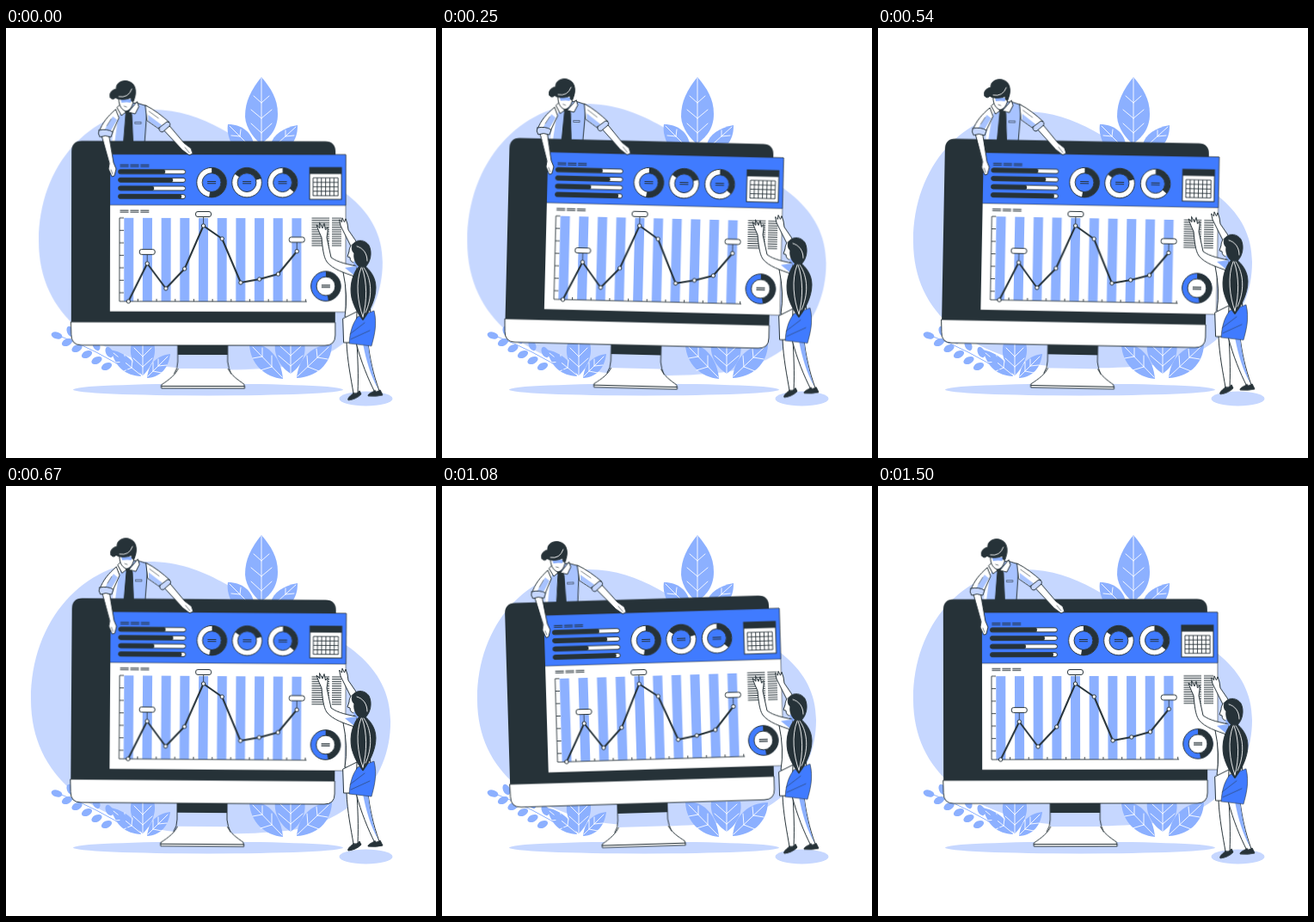
Animation, 500 px wide and 500 px high, one loop 1540 ms. Source, as an HTML page:

```html
<!DOCTYPE html>
<html lang="en">
<head>
<meta charset="utf-8">
<title>Dashboard teamwork</title>
<style>
  :root { --blue: #407bff; --mid: #8cb0ff; --light: #c6d7ff; --shirt: #a8c3ff; --ink: #263238; }
  html, body { margin: 0; width: 100%; height: 100%; overflow: hidden; background: #fff; }
  svg { display: block; width: 100vw; height: 100vh; }
  .blue { fill: var(--blue); }
  .mid { fill: var(--mid); }
  .light { fill: var(--light); }
  .shirt { fill: var(--shirt); }
  .ink { fill: var(--ink); }
  .white { fill: #fff; }
  .none { fill: none; }
  .line { stroke: var(--ink); stroke-width: 1; stroke-linejoin: round; stroke-linecap: round; }
  .vein { fill: none; stroke: #fff; stroke-width: .9; stroke-linecap: round; }
  .thin { stroke-width: .6; }

  #blob, #desk, #woman { animation: 1540ms linear -21ms infinite; }
  #blob { animation-name: beat; transform-origin: 238px 246px; }
  #desk { animation-name: sway; transform-origin: 235px 240px; }
  #woman { animation-name: rise; }
  @keyframes beat {
    0%, 29.2%, 39%, 58.4%, 100% { transform: scale(1); }
    9.7%, 48.7% { transform: scale(1.1); }
  }
  @keyframes sway {
    0%, 100% { transform: rotate(0deg); }
    25% { transform: rotate(2deg); }
    75% { transform: rotate(-2deg); }
  }
  @keyframes rise {
    0%, 100% { transform: translateY(0); }
    50% { transform: translateY(-10px); }
  }
</style>
</head>
<body>
<svg viewBox="0 0 500 500">
  <path id="blob" class="light" d="M41 248C41 160 100 98 170 97C235 97 268 136 320 156C380 178 435 210 435 272C435 340 385 385 320 392C280 396 230 397 190 392C110 378 41 335 41 248Z"/>

  <g id="plants">
    <path class="mid" d="M297 57C285 72 278 85 278 103C279 118 289 128 296 135C306 128 316 118 316 100C316 82 308 70 297 57Z"/>
    <path class="mid" d="M258 112C275 112 286 122 288 135L262 134C258 126 257 118 258 112Z"/>
    <path class="mid" d="M339 113C322 116 311 124 308 135L333 134C338 127 339 120 339 113Z"/>
    <path class="vein" d="M297 58V133M297 87L288 79M297 87L306 79M297 105L285 95M297 105L309 95M297 122L285 111M297 122L309 111M260 114L279 133M272 126L273 118M272 126L262 125M337 115L316 134M325 126L325 119M325 126L335 125"/>

    <path class="mid" d="M146 367H172C176 380 168 396 159 404C149 396 142 380 146 367Z"/>
    <path class="mid" d="M191 379C176 381 166 389 164 407C180 406 189 395 191 379Z"/>
    <path class="mid" d="M122 374C136 377 151 386 157 405C139 404 127 395 122 374Z"/>
    <path class="vein" d="M159 367V403M159 382L149 372M159 382L169 372M159 394L148 384M159 394L170 384M188 382L165 405M177 393V385M177 393L187 392M171 399L171 389M171 399L181 401M125 378L156 403M137 388L138 380M137 388L127 389M146 395L147 386M146 395L137 399"/>

    <path class="mid" d="M313 367H347C350 382 341 395 331 402C320 395 311 382 313 367Z"/>
    <path class="mid" d="M283 368C302 364 320 382 322 408C301 406 284 391 283 368Z"/>
    <path class="mid" d="M379 368C358 368 340 382 338 407C360 406 378 392 379 368Z"/>
    <path class="vein" d="M331 367V402M331 381L319 370M331 381L343 370M331 393L317 381M331 393L345 381M287 371L321 406M298 382V372M298 382L287 384M309 394V381M309 394L296 398M375 371L339 405M362 383L361 373M362 383L374 385M351 394L350 381M351 394L364 399"/>
    <g id="sprig"><path fill="none" stroke="#8cb0ff" d="M62 358Q105 374 148 402"/></g>
  </g>

  <ellipse class="light" cx="235" cy="420.5" rx="157" ry="7"/>
  <ellipse class="light" cx="418.5" cy="431" rx="31" ry="8.5"/>

  <g id="desk">
    <!-- man, body -->
    <g class="line">
      <path class="shirt" d="M127 96L139 90L151 87L164 91L161 134H125Z"/>
      <path class="white" d="M127 95L134 92L129 112L126 134H123Z" stroke="none"/>
      <path class="ink" d="M139 97L144 96L146 101L147.500 133H136.500L139 101Z"/>
      <path class="white" d="M133 89L139 98L134 102L129 93ZM152 86L142 98L150 100L154 92Z"/>
      <path class="white" d="M131 79C130 88 133 95 139 97C145 96 149 88 148 79Z"/>
      <path class="mid" d="M133 83H146L144.500 87L140 86.500L134 87Z" stroke="none"/>
      <path class="none thin" d="M137 91L140 92M150 109.500H157V111.500H150Z"/>
      <path class="ink" d="M121 81C119 76 123 72 128 71C127 64 136 59 144 63C151 66 152 76 148 85C146 87 145 85 145 81C140 84 130 84 127 81C125 84 122 83 121 81Z"/>
    </g>
    <path class="vein" stroke-width=".5" d="M131 80Q142 82 146 71"/>

    <!-- monitor -->
    <path class="light" d="M200 378H259V396H200Z"/>
    <path class="white line" d="M201 395H258C262 404 270 409 277 414L278 419H181V415C190 409 198 403 201 395Z"/>
    <path class="light" d="M200 392H259V396H200Z"/>
    <path class="none line" d="M200 369V388Q200 396 196 402M258 369V388Q259 396 262 402M181 416.500H278"/>
    <path class="ink" d="M200 369H258V380H200Z"/>
    <path class="ink" d="M76 343V144Q76 131.500 88 131.500H371Q383 131.500 383 144V343Z"/>
    <path class="white line" d="M76 342H383V357Q383 369 371 369H88Q76 369 76 357Z"/>

    <!-- board -->
    <path class="white line thin" d="M121 147H395V330H121Z"/>
    <path class="blue line thin" d="M121 147H395V206H121Z"/>
    <g id="board"></g>

    <!-- man, arms -->
    <g class="line">
      <path class="white" d="M111 124L119 122L125 157L128 164L126 172L123 173L119 164L120 158Z"/>
      <path class="white" d="M127 95C118 103 112 110 108 121L122 125L131 105Z"/>
      <path class="shirt" d="M124 103L114 119L121 121L129 107Z" stroke="none"/>
      <path class="light" d="M108 119Q117 117 124 121L122 127Q115 124 109 127Q106 123 108 119Z"/>
      <path class="white" d="M183 118L190 114L207 134L215 140L217 146L213 148L205 142Z"/>
      <path class="white" d="M162 90C172 95 181 102 190 110L180 119L164 108Z"/>
      <path class="shirt" d="M165 101L181 113L178 117L165 108Z" stroke="none"/>
      <path class="light" d="M178 116L187 109Q192 110 190 114L182 121Q177 121 178 116Z"/>
      <path class="none thin" d="M122 165L124 170M208 139L213 145M166 97L177 105M122 106L117 114"/>
    </g>
  </g>

  <g id="woman" class="line">
    <!-- far arm -->
    <path class="white" d="M409 251L398 235L397 228L395 222L393.500 226L391 221L390.500 226L387.500 223L389 230L392 236L401 254Z"/>
    <!-- legs -->
    <path class="white" d="M396 366C397 388 401 407 404 425H409C410 402 409 385 408 367Z"/>
    <path class="white" d="M407 366C413 389 421 408 429 424L434 422C427 403 423 384 421 367Z"/>
    <path class="mid" d="M415 367L421 367C423 386 428 408 433 421C424 404 419 388 415 367Z" stroke="none"/>
    <path class="ink" d="M404 425Q408 427 411 422L413 426Q407 432 398 433Q396 431 404 425ZM429 422Q432 425 435 421L438 427Q431 429 421 428Q420 426 429 422Z"/>
    <!-- torso -->
    <path class="white" d="M392 284L406 275L418 284L424 332L406 338L394 336Q398 312 392 284Z"/>
    <path class="white" d="M392 338L408 330L407 366L393 366Z"/>
    <path class="blue" d="M409 336L428 329C432 345 428 359 425 370L399 367C400 355 402 345 409 336Z" stroke-width=".6"/>
    <path class="none" d="M400 356L417 343M401 362L423 352" stroke-width=".5"/>
    <!-- face and hair -->
    <path class="white" d="M408 251C401 250 399 256 399 260L397 266L400 267Q400 273 406 273L407 280L414 282L416 262Z"/>
    <path class="mid" d="M404 272L411 270L410 281L406 278Z" stroke="none"/>
    <path class="ink" d="M404 251C409 245 418 247 422 253C426 261 424 272 418 278L411 278C406 274 404 268 405 262C402 260 401 254 404 251Z"/>
    <!-- near arm -->
    <path class="white" d="M407 277C398 275 386 273 378 267L373 244L374 237L374 232L371.500 235L370 227.500L368 233L364.500 226.500L365 233L361 229L363.500 236L367 244C368 255 369 266 373 272C380 281 394 285 405 289Z"/>
    <path class="mid" d="M394 279L408 277L405 288Z" stroke="none"/>
    <path class="ink" d="M412 276C403 284 399 300 402 314C405 326 411 335 415 340C422 331 430 316 430 302C430 290 423 281 416 276Z"/>
    <g class="vein" stroke-width=".6">
      <path d="M413 279C406 296 409 320 415 336M414 279C420 295 420 318 415 336M416 279C426 293 426 314 418 331M408 254C415 256 420 262 420 271"/>
    </g>
  </g>
</svg>

<script>
const NS = 'http://www.w3.org/2000/svg';
const INK = '#263238', BLUE = '#407bff', MID = '#8cb0ff';
const board = document.getElementById('board');

function add(parent, tag, attrs) {
  const el = document.createElementNS(NS, tag);
  for (const k in attrs) el.setAttribute(k, attrs[k]);
  parent.append(el);
  return el;
}
const rect = (x, y, width, height, fill, more) =>
  add(board, 'rect', { x, y, width, height, fill, ...more });
const path = (d, stroke, width = .8) =>
  add(board, 'path', { d, stroke, fill: 'none', 'stroke-width': width, 'stroke-linejoin': 'round' });
const outline = { stroke: INK, 'stroke-width': 1 };

function caption(y) {
  for (let i = 0; i < 3; i++) {
    const x = 132.500 + i * 11.900;
    path(`M${x} ${y}h10m-10 2h10`, INK, 1.1);
  }
}

// Ring gauge; the dark arc runs from a to b, in degrees clockwise from the top.
function gauge(x, y, a, b, base, hub) {
  const at = deg => {
    const r = deg * Math.PI / 180;
    return `${x + 14 * Math.sin(r)} ${y - 14 * Math.cos(r)}`;
  };
  add(board, 'circle', { cx: x, cy: y, r: 17.3, fill: base, ...outline });
  path(`M${at(a)}A14 14 0 ${b - a > 180 ? 1 : 0} 1 ${at(b)}`, INK, 6.6);
  add(board, 'circle', { cx: x, cy: y, r: 10.9, fill: hub, ...outline });
  path(`M${x - 5} ${y - 1.100}h10m-10 2.200h10`, INK, 1.1);
}

// Header
caption(159.300);
[185, 194, 172, 204].forEach((end, i) => {
  const y = 164.800 + i * 9.600;
  rect(130.500, y, 78, 5, '#fff', { rx: 2.5, ...outline });
  rect(130.500, y, end - 130.500, 5, INK, { rx: 1.8 });
});
gauge(239, 179.600, 0, 190, '#fff', BLUE);
gauge(280, 179.600, -55, 75, '#fff', BLUE);
gauge(321.500, 179.600, 0, 130, '#fff', BLUE);

// Calendar
rect(353, 162, 37, 37, '#fff', outline);
rect(353, 162, 37, 7.5, INK);
let grid = '';
for (let i = 0; i < 7; i++) grid += `M${357 + i * 4.850} 174v21`;
for (let i = 0; i < 5; i++) grid += `M357 ${174 + i * 5.200}h29`;
path(grid, INK, .9);

// Chart
caption(212.200);
let ticks = 'M132 221V318H350';
for (let i = 0; i < 7; i++) ticks += `M132 ${221 + i * 14.500}h5`;
for (let i = 0; i < 10; i++) {
  rect(137.300 + i * 21.680, 221, 11, 97, MID);
  ticks += `M${153.500 + i * 21.680} 318v-3`;
}
path(ticks, INK, .9);

const levels = [318, 274, 303, 280, 230, 245, 296, 292, 286, 259.500];
const points = levels.map((y, i) => [142.500 + i * 21.750, y]);
for (const i of [1, 4, 9]) {
  const [x, y] = points[i];
  path(`M${x} ${y}v-12`, INK);
  rect(x - 9, y - 16.500, 18, 6, '#fff', { rx: 2.5, ...outline });
}
path('M' + points.join('L'), INK, 2);
for (const [cx, cy] of points) add(board, 'circle', { cx, cy, r: 2.2, fill: '#fff', ...outline });

// Article and lower gauge
let text = '';
for (let i = 0; i < 13; i++) text += `M355.500 ${221 + i * 2.650}h20.500m3 0h11`;
path(text, INK, 1);
gauge(372, 300, 0, 170, BLUE, '#fff');

// Sprig leaflets
const sprig = document.getElementById('sprig');
function leaflet(x, y, turn) {
  add(sprig, 'ellipse', { cx: x, cy: y, rx: 6.5, ry: 4, fill: MID, transform: `rotate(${turn} ${x} ${y})` });
}
leaflet(59, 357.500, 15);
for (let i = 0; i < 5; i++) {
  leaflet(75 + i * 15, 353 + i * 8, 65);
  leaflet(71 + i * 11.500, 365.500 + i * 7, -25);
}
</script>
</body>
</html>
```
